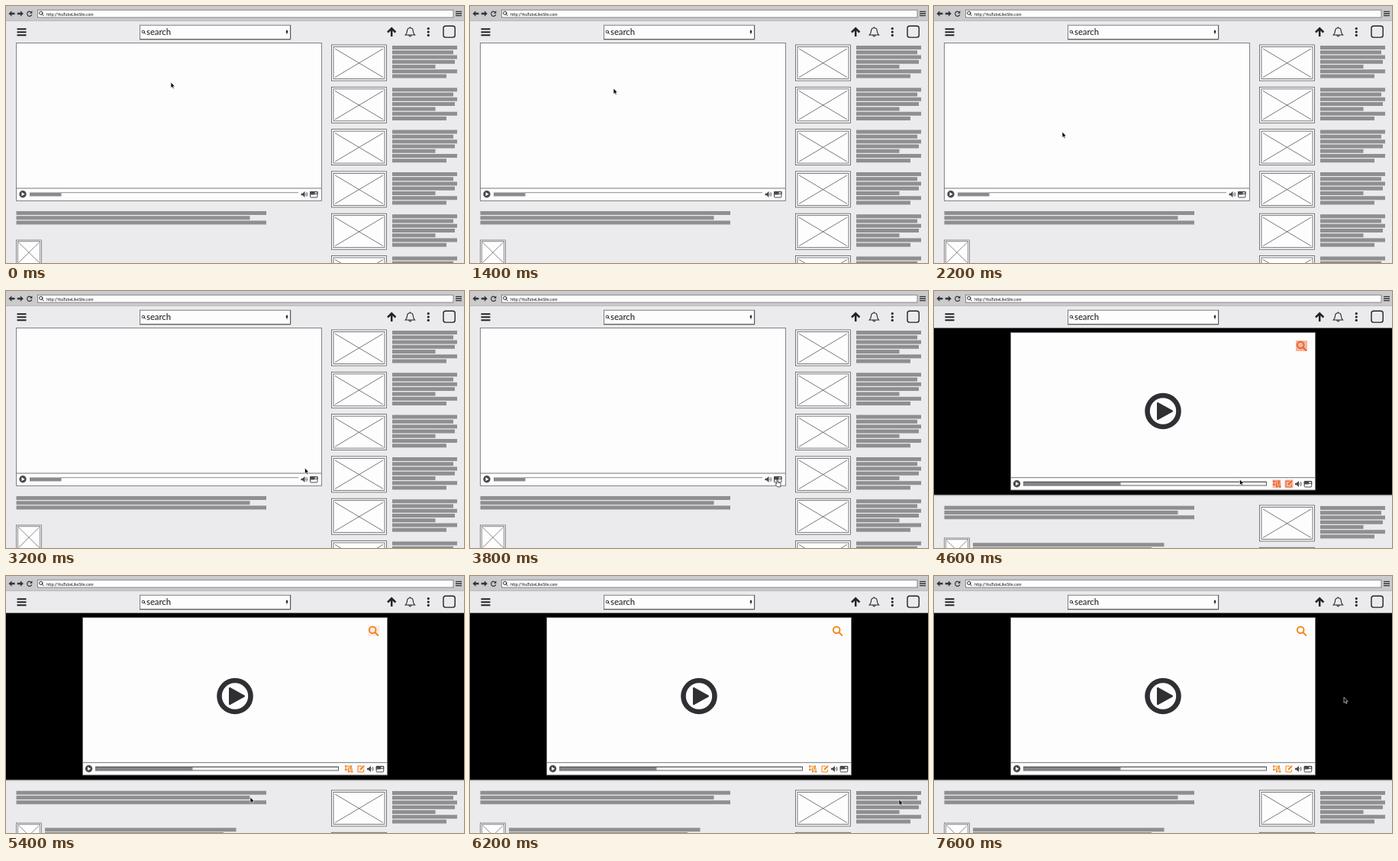
These frames come from a looping animation (600x337 px, 8 s). An HTML page:

```html
<!DOCTYPE html>
<html lang="en">
<head>
<meta charset="utf-8">
<title>Video page wireframe</title>
<style>
html, body { margin: 0; width: 100%; height: 100%; overflow: hidden; background: #ebeaec; }
svg { display: block; width: 600px; height: 337px; }
text { font-family: Lato, sans-serif; fill: #151515; }
</style>
</head>
<body>
<svg id="stage" viewBox="0 0 600 337">
  <defs>
    <g id="lens" fill="none" stroke-linecap="round">
      <circle r="4.3" cx="5" cy="5"/><path d="M8.3 8.3 12 12"/>
    </g>
    <g id="thumb" fill="#fdfdfe" stroke="#58575a" stroke-width=".8">
      <rect x="426.5" y="51" width="72" height="47"/>
      <rect x="429" y="53.5" width="67" height="42"/>
      <path d="M431 56 494 93.5M494 56 431 93.5"/>
    </g>
    <g id="avatar" fill="#fdfdfe" stroke="#58575a" stroke-width=".7">
      <rect x="13.5" y="307" width="33" height="33"/>
      <rect x="15.3" y="308.8" width="29.4" height="29.4"/>
      <path d="M16.5 310 43.5 336.5M43.5 310 16.5 336.5"/>
    </g>
    <g id="play">
      <circle r="4.7" fill="#4a494c"/><path d="M-1.5-2.5 2.6 0-1.5 2.5Z" fill="#fff"/>
    </g>
    <g id="sound">
      <path d="M0 2.7H2L5 0V8L2 5.3H0Z" fill="#4a494c"/>
      <path d="M6 2.6Q7 4 6 5.4M7.2 1Q9.5 4 7.2 7" fill="none" stroke="#4a494c" stroke-width=".8"/>
    </g>
    <g id="pip">
      <rect x=".5" y=".5" width="9.5" height="7.5" rx="1" fill="#fff" stroke="#4a494c"/>
      <path d="M0 1Q0 0 1 0H9.5Q10.5 0 10.5 1V4H6V4.5H0Z" fill="#4a494c"/>
      <rect x="6.5" y="1.2" width="2.8" height="2" fill="#ddd"/>
    </g>
  </defs>

  <rect width="600" height="337" fill="#ebeaec"/>

  <g id="normal">
    <rect x="13.5" y="48.5" width="400" height="207" fill="#fdfdfe" stroke="#77767a" stroke-width=".9"/>
    <path d="M13.5 239H413.5" stroke="#77767a"/>
    <use href="#play" x="22" y="246.7"/>
    <path d="M72 244.7H383" stroke="#727174" stroke-width=".8"/>
    <rect x="31" y="244.5" width="41.5" height="5" fill="#8b8a8c"/>
    <use href="#sound" x="386.5" y="243"/>
    <use href="#pip" x="398" y="243"/>
    <use href="#avatar"/>
  </g>

  <g id="theater">
    <rect y="48.5" width="600" height="219" fill="#000"/>
    <path d="M0 268H600" stroke="#aaa9ab"/>
    <rect x="100.5" y="54.5" width="399" height="206.5" fill="#fdfdfe" stroke="#77767a" stroke-width=".9"/>
    <path d="M100.5 244.7H499.5" stroke="#77767a"/>
    <circle cx="300" cy="157.5" r="20.5" fill="#fdfdfe" stroke="#302f33" stroke-width="6.6"/>
    <path d="M293 147 312 157.5 293 168Z" fill="#302f33" stroke="#302f33" stroke-width="2" stroke-linejoin="round"/>
    <use href="#play" x="108.5" y="252.7"/>
    <rect x="117.5" y="250.3" width="318" height="4.7" fill="#fdfdfe" stroke="#4f4e51" stroke-width=".9"/>
    <rect x="117.5" y="250.8" width="127" height="4.4" fill="#858487"/>
    <path d="M117 250.4H436" stroke="#4f4e51"/>
    <use href="#sound" x="473" y="249"/>
    <use href="#pip" x="484.7" y="249"/>
    <g id="glow" fill="#f7b6a2">
      <rect x="474" y="65" width="15" height="14"/>
      <rect x="443.5" y="247.5" width="11" height="10.5"/>
      <rect x="459.5" y="247.5" width="11" height="10.5"/>
    </g>
    <g id="tools" fill="none" stroke="#ee8a1d">
      <use href="#lens" x="475.2" y="65.7" stroke-width="2"/>
      <path d="M445.5 249.5H451.5V254H445.5ZM448.5 251.5H453V256.3H448.5Z" stroke-width=".9"/>
      <path d="M444 249.5H446M451 249.5H453M444 254H446M452 256.5H454.5M448 256.5H450" stroke-width="2"/>
      <path d="M466 249.3H461V257H468.5V253.5"/>
      <path d="M464 254 469 249" stroke-width="2"/>
    </g>
    <use href="#avatar" y="17"/>
    <path d="M51 332.8H301.5M51 338.6H285" stroke="#8f8e90" stroke-width="5"/>
  </g>

  <g id="side"></g>
  <g id="caption" stroke="#8f8e90" stroke-width="5">
    <path d="M13.5 271.5H341M13.5 277.8H319.5M13.5 284H341"/>
  </g>

  <g id="browser">
    <rect width="600" height="19" fill="#cbcacc"/>
    <path d="M0 19.3H600" stroke="#a9a8ab" stroke-width=".8"/>
    <rect x="41.5" y="5.2" width="544.5" height="9.8" fill="#fdfdfe" stroke="#6e6d70" stroke-width=".8"/>
    <g fill="#343337">
      <path id="back" d="M3.5 10 7.4 6.3V8.8H11.5V11.2H7.4V13.7Z"/>
      <path d="M22.8 10 18.9 6.3V8.8H14.8V11.2H18.9V13.7Z"/>
      <path d="M34.4 6.3V9.8H30.9Z"/>
    </g>
    <path d="M33.2 8.3A3.1 3.1 0 1 0 33.7 11.2" fill="none" stroke="#343337" stroke-width="1.2"/>
    <use href="#lens" transform="translate(43.3 6.8) scale(.5)" stroke="#222" stroke-width="2"/>
    <text x="53" y="13.2" font-size="5.2">http://YouTubeLikeSite.com</text>
    <path d="M589 7.4H597M589 10H597M589 12.6H597" stroke="#333" stroke-width="1.3"/>
  </g>

  <g id="header" fill="none" stroke="#232226">
    <path d="M14.5 30.2H26.5M14.5 34.2H26.5M14.5 38.2H26.5" stroke-width="1.9"/>
    <rect x="175.5" y="25.2" width="197" height="18.3" fill="#fdfdfe" stroke="#727174" stroke-width=".9"/>
    <path d="M372.7 25V43.8H175" stroke="#505053"/>
    <use href="#lens" transform="translate(177.8 31.8) scale(.4)" stroke-width="2.3"/>
    <text x="184" y="38" font-size="11.3" stroke="none">search</text>
    <rect x="367" y="31.6" width="2" height="3.8" rx="1" fill="#232226" stroke="none"/>
    <path d="M366.3 34Q368 37 369.7 34M368 35.5V37.3" stroke-width=".5"/>
    <path d="M505.2 40V30M500 34.5 505.2 29.3 510.4 34.5" stroke-width="2.5"/>
    <path d="M523.3 38H535.5C533.5 36 533.5 34.5 533.3 32.5C533 29.8 531.3 28.8 529.4 28.8S525.8 29.8 525.5 32.5C525.3 34.5 525.3 36 523.3 38ZM529.4 28.5V27.2M527.8 38.5Q529.4 41.5 531 38.5" stroke-width="1.1"/>
    <g fill="#232226" stroke="none">
      <circle cx="553.3" cy="29.6" r="1.6"/><circle cx="553.3" cy="34" r="1.6"/><circle cx="553.3" cy="38.4" r="1.6"/>
    </g>
    <rect x="573" y="26.3" width="15.2" height="14.8" rx="2.8" stroke-width="1.4"/>
  </g>

  <path id="arrow" d="M0 0V7.4L1.7 5.9 2.9 8.5 4.1 7.9 3 5.4H5.2Z" fill="#000" stroke="#fff" stroke-width=".6"/>
  <path id="hand" d="M2.2 6V1Q2.2 0 3 0T3.8 1V4L6.8 4.7Q7.6 5 7.5 6L7 9.8H3L.4 6.6Q.5 5.2 2.2 6Z" fill="#fff" stroke="#222" stroke-width=".75"/>
</svg>

<script>
const LOOP = 8000, STEP = 200;
const HAND_ON = 3800, SWITCH = 4600;
const el = id => document.getElementById(id);

// Sidebar: repeated thumbnails with seven ragged lines each
const ends = [591, 586, 591, 588, 562.5, 591, 577];
const lines = ends.map((x, i) => `M506 ${54.5 + i * 6.27}H${x}`).join('');
el('side').innerHTML = Array.from({ length: 6 }, (_, i) =>
  `<g transform="translate(0 ${i * 55.3})"><use href="#thumb"/>
   <path d="${lines}" stroke="#8f8e90" stroke-width="5"/></g>`).join('');

// Pointer path: time, x, y
const path = [
  [0, 216, 100], [600, 194, 104], [1200, 194, 104], [1400, 188, 108],
  [1600, 158, 138], [1800, 144, 180], [2000, 154, 206], [2200, 168, 165],
  [2400, 168, 165], [2800, 230, 176], [3200, 391.5, 232], [3600, 400.5, 247],
  [4600, 400.5, 247], [5000, 350, 268], [5400, 320, 290], [5800, 470, 301],
  [6200, 562, 293], [7000, 562, 293], [7600, 537, 159], [8000, 537, 159]
];

function pointAt(t) {
  const i = Math.max(1, path.findIndex(p => p[0] >= t));
  const [t0, x0, y0] = path[i - 1], [t1, x1, y1] = path[i];
  const k = (t - t0) / (t1 - t0);
  return [x0 + (x1 - x0) * k, y0 + (y1 - y0) * k];
}

const show = (id, on) => el(id).setAttribute('display', on ? 'inline' : 'none');
const shift = (id, x, y) => el(id).setAttribute('transform', `translate(${x} ${y})`);

function draw(now) {
  const t = Math.floor((now % LOOP) / STEP) * STEP;
  const wide = t >= SWITCH, hand = t >= HAND_ON && !wide;
  const [x, y] = pointAt(t);
  show('normal', !wide);
  show('theater', wide);
  shift('side', 0, wide ? 230 : 0);
  shift('caption', 0, wide ? 12.7 : 0);
  const glow = Math.max(0, Math.min(1, (5600 - t) / 800));
  el('glow').setAttribute('opacity', glow);
  el('tools').setAttribute('stroke', glow > .5 ? '#e9652b' : '#ee8a1d');
  show('arrow', !hand);
  show('hand', hand);
  shift('arrow', x, y);
  shift('hand', 399.7, 247);
}

const start = performance.now();
function tick() {
  draw(performance.now() - start);
  requestAnimationFrame(tick);
}
tick();
</script>
</body>
</html>
```
